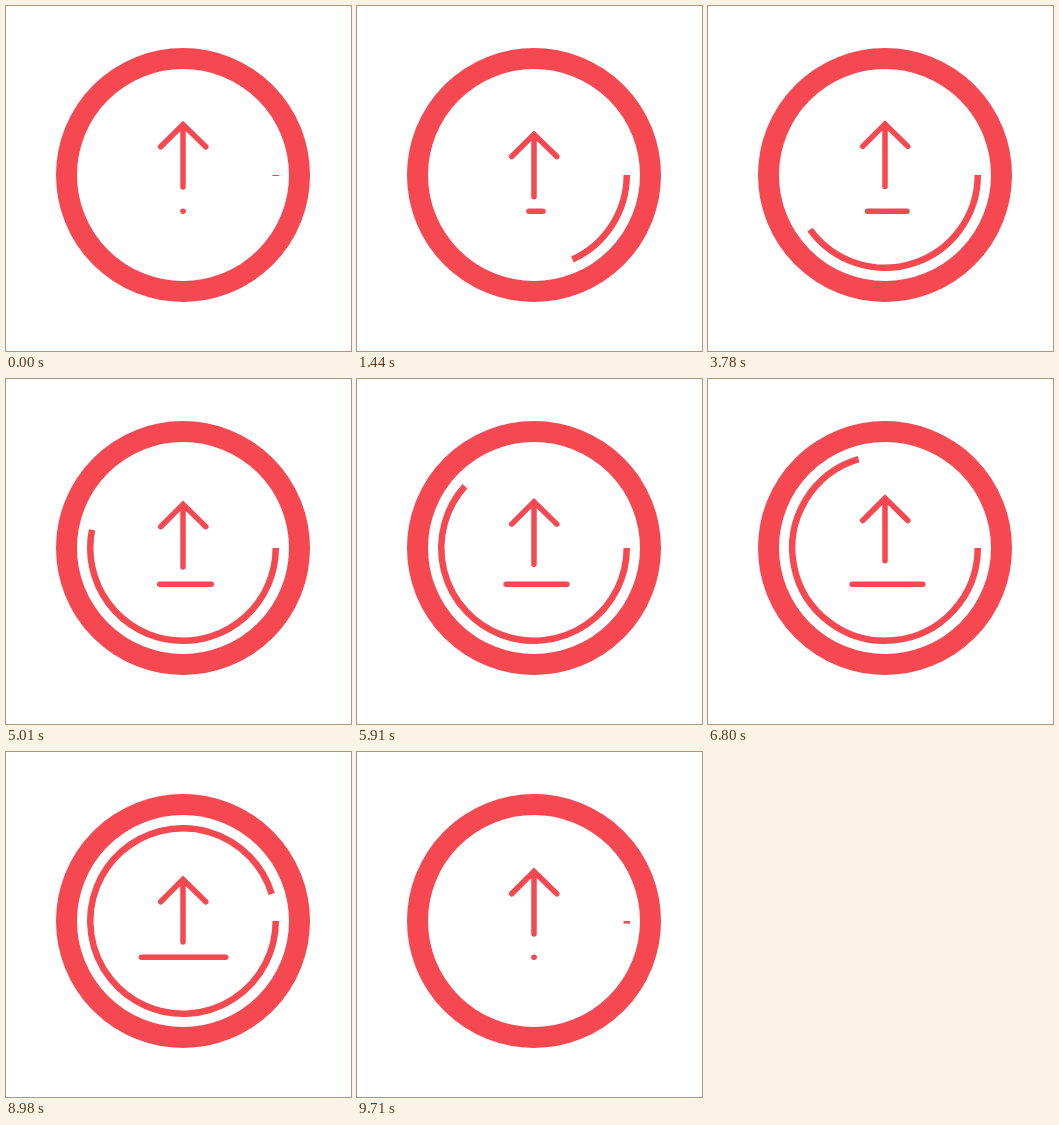
Write an HTML page that moves like this. It is 345x345 px and loops after 9.79 s.

```html
<!DOCTYPE html>
<html lang="en">
<head>
<meta charset="utf-8">
<title>Upload progress</title>
<style>
  html, body { margin: 0; height: 100%; overflow: hidden; background: #fff; }
  svg { display: block; width: 100vw; height: 100vh; fill: none; stroke: #f64851; stroke-width: 5.5; stroke-linecap: round; }
</style>
</head>
<body>
<svg viewBox="0 0 345 345">
  <circle cx="177" cy="169" r="116.5" stroke-width="21"/>
  <path id="arc" stroke-width="6.5" stroke-linecap="butt"/>
  <path id="arrow" d="M154.7 140.3 177 118l22.8 22.3M177 118v62.5"/>
  <path id="base"/>
</svg>
<script>
const LOOP = 9790, CYCLE = 9680, START = 30, STEPS = 10;
const RADIUS = 92.75;
// Length of each half of the base line at the end of every step
const LEFT = [0, 2, 5.7, 13.3, 17.5, 21.5, 27, 32.7, 36.5, 40.5, 42.5];
const RIGHT = [0, 4, 10, 18.4, 22, 26.5, 32, 37.7, 40, 42.3, 43];
const [arc, arrow, base] = ['arc', 'arrow', 'base'].map(id => document.getElementById(id));

// cubic-bezier(.25, .1, .25, 1)
function ease(x) {
  let lo = 0, hi = 1, u;
  for (let i = 0; i < 24; i++) {
    u = (lo + hi) / 2;
    if (0.75 * u * (1 - u) + u ** 3 < x) lo = u; else hi = u;
  }
  return 0.3 * u * (1 - u) ** 2 + 3 * u * u * (1 - u) + u ** 3;
}

const mix = (a, b, k) => a + (b - a) * k;

function draw(now) {
  const phase = (now % LOOP + START) % CYCLE / CYCLE * STEPS;
  const step = Math.floor(phase), part = phase - step, k = ease(part);

  const turn = (step + k) / STEPS;
  const angle = Math.min(turn, 0.9999) * 2 * Math.PI;
  const x = 177 + RADIUS * Math.cos(angle), y = 169 + RADIUS * Math.sin(angle);
  arc.setAttribute('d', `M${177 + RADIUS} 169A${RADIUS} ${RADIUS} 0 ${+(turn > 0.5)} 1 ${x} ${y}`);

  const drop = part < 0.5 ? ease(part * 2) : 1 - ease(part * 2 - 1);
  arrow.setAttribute('transform', `translate(0 ${10.5 * drop})`);

  const left = mix(LEFT[step], LEFT[step + 1], k);
  const right = mix(RIGHT[step], RIGHT[step + 1], k);
  base.setAttribute('d', `M${177 - left} 205.3H${177.01 + right}`);
}

const begin = performance.now();
function tick() {
  draw(performance.now() - begin);
  requestAnimationFrame(tick);
}
tick();
</script>
</body>
</html>
```
